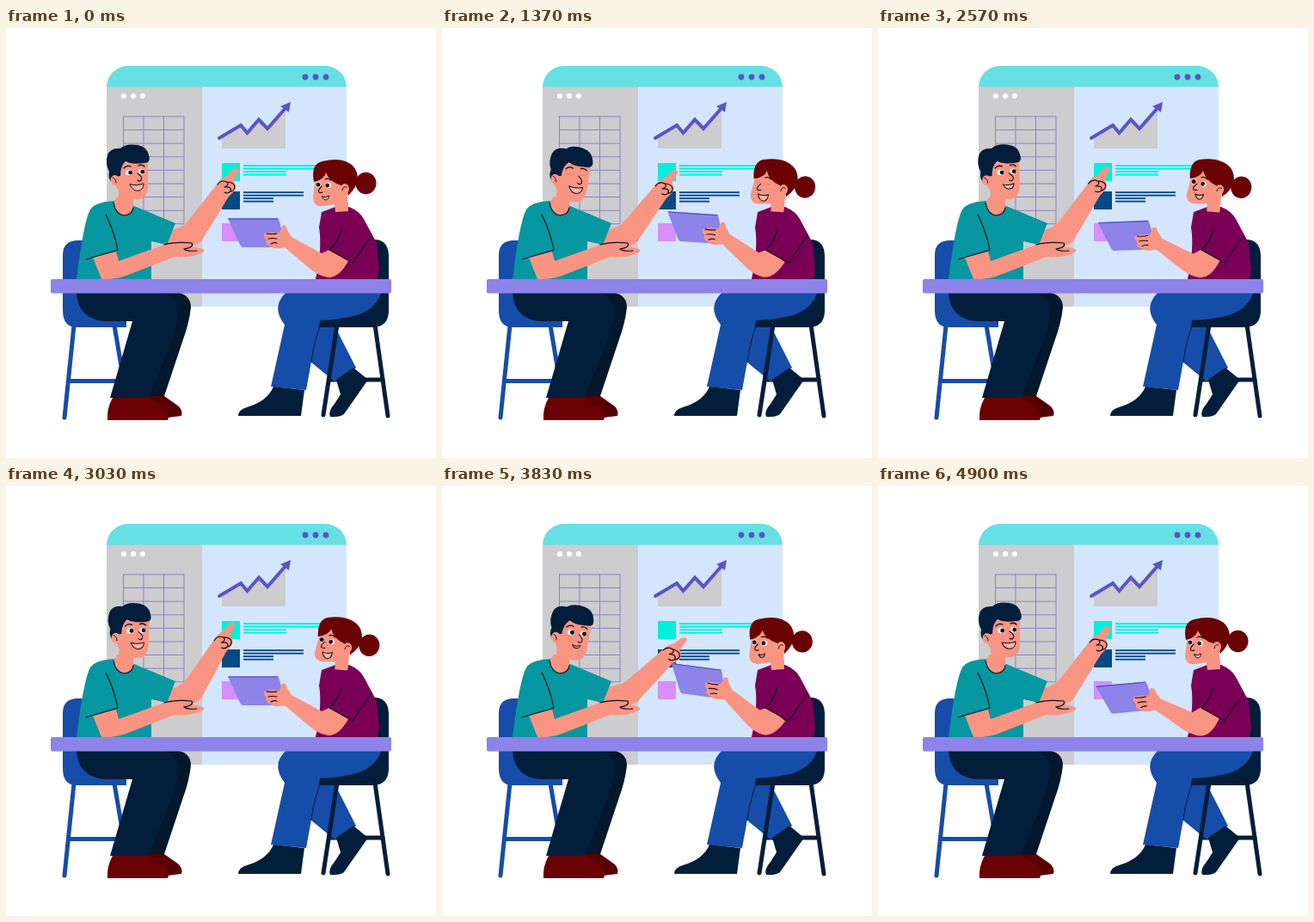
These frames come from a looping animation (500 px wide and 500 px high, 4.93 s). An HTML page with a canvas:

```html
<!DOCTYPE html>
<html lang="en">
<head>
<meta charset="utf-8">
<title>Meeting</title>
<style>
html, body { margin: 0; width: 100%; height: 100%; overflow: hidden; background: #fff; }
canvas { display: block; width: 500px; height: 500px; }
</style>
</head>
<body>
<canvas id="stage" width="500" height="500"></canvas>
<script>
const ctx = document.getElementById('stage').getContext('2d');
const LOOP = 4930;
const NAVY = '#021e3b', BLUE = '#164da9', SKIN = '#fa9482', TEAL = '#0697a0',
  PLUM = '#7a0056', RED = '#6a0205', VIOLET = '#5b54c4', LILAC = '#8d83e9', INK = '#08111c';

// Keys are [time, value] pairs, eased at both ends.
const tracks = {
  manHead: [[0, 0], [1150, 12], [2100, -4], [3000, 2], [4050, 12], [4930, 0]],
  pointing: [[0, 0], [560, -7], [1750, 5], [3000, -3.5], [3860, 11], [4930, 0]],
  womanHead: [[0, 0], [600, -5], [1400, 8], [3050, 8.5], [4000, 0], [4930, 0]],
  manMouth: [[0, 1], [570, 0.1], [1370, 1], [2070, 0.2], [3030, 0.9], [3830, 0.1], [4850, 1], [4930, 1]],
  womanMouth: [[0, 0.3], [570, 0.2], [1370, 1], [2070, 0.2], [3030, 0.9], [3830, 0.2], [4930, 0.3]]
};
const tabletKeys = [[0, 0], [1000, 8.2], [2000, -5.6], [3000, 0]];
const blinks = [570, 1365, 2085, 3500, 4340];

function at(keys, t) {
  for (let i = 1; i < keys.length; i++) {
    const [t0, a] = keys[i - 1], [t1, b] = keys[i];
    if (t <= t1) {
      const u = (t - t0) / (t1 - t0);
      return a + (b - a) * u * u * (3 - 2 * u);
    }
  }
  return keys[keys.length - 1][1];
}

function eyeOpen(t) {
  const gap = Math.min(...blinks.map(b => Math.abs(t - b)));
  return Math.max(0, Math.min(1, (gap - 10) / 110));
}

const cache = {};
const path = d => cache[d] || (cache[d] = new Path2D(d));
function fill(color, d) { ctx.fillStyle = color; ctx.fill(path(d)); }
function line(color, width, d) {
  ctx.strokeStyle = color;
  ctx.lineWidth = width;
  ctx.stroke(path(d));
}
function rect(color, x, y, w, h) { ctx.fillStyle = color; ctx.fillRect(x, y, w, h); }
function oval(color, x, y, rx, ry = rx) {
  ctx.fillStyle = color;
  ctx.beginPath();
  ctx.ellipse(x, y, rx, ry, 0, 0, Math.PI * 2);
  ctx.fill();
}
function turned(x, y, degrees, draw) {
  ctx.save();
  ctx.translate(x, y);
  ctx.rotate(degrees * Math.PI / 180);
  ctx.translate(-x, -y);
  draw();
  ctx.restore();
}

function eye(x, y, rx, look, open) {
  if (open < 0.1) {
    line('#d87a6c', 0.7, `M${x - rx} ${y}Q${x} ${y + 1.5} ${x + rx} ${y}`);
    return;
  }
  oval('#fff', x, y, rx, 3.2 * open);
  oval(INK, x + look, y, 2.4, 2.5 * open);
}

function mouth(x, y, w, open) {
  const half = w * (0.5 + 0.5 * open) / 2, deep = 4 + open * 7;
  ctx.beginPath();
  ctx.moveTo(x - half, y);
  ctx.quadraticCurveTo(x, y + 2, x + half, y - 1);
  ctx.bezierCurveTo(x + half, y + deep * 0.8, x - half * 0.4, y + deep, x - half, y);
  ctx.fillStyle = '#fcb4a8';
  ctx.fill();
  ctx.strokeStyle = INK;
  ctx.lineWidth = 1;
  ctx.stroke();
}

function textLines(color, y, long, short) {
  [long, long, short, short].forEach((w, i) => rect(color, 276, y + i * 3.5, w, 1.9));
}

function board() {
  ctx.save();
  ctx.beginPath();
  ctx.roundRect(117, 44, 279, 280, [25, 25, 0, 0]);
  ctx.clip();
  rect('#d3e6fe', 117, 44, 279, 280);
  rect('#cdccce', 117, 68, 111, 256);
  rect('#66e0e4', 117, 44, 279, 24.5);
  ctx.restore();

  for (let i = 0; i < 3; i++) {
    oval(VIOLET, 348 + i * 12, 57, 3.4);
    oval('#fff', 137 + i * 11, 79, 3.1);
  }
  for (let i = 0; i < 4; i++) rect('#827cc8', 136 + i * 23.5, 102.5, 0.9, 125);
  for (let i = 0; i < 9; i++) rect('#827cc8', 136, 102.5 + i * 15.6, 71, 0.9);

  fill('#cdccce', 'M251 140V128L273 115 281 123 294 107 304 118 325 95V140Z');
  ctx.lineJoin = 'miter';
  line(VIOLET, 4, 'M248 128L273 113 280.5 122 294 106.5 304 117 326 92');
  ctx.lineJoin = 'round';
  fill(VIOLET, 'M331 86L329 98 319 91Z');

  rect('#00f0dc', 251, 157, 21, 21);
  rect('#064a86', 251, 190, 21, 21);
  rect('#d68ffc', 251, 227, 21, 21);
  textLines('#00f0dc', 159.2, 90, 50);
  textLines('#064a86', 190.2, 70, 35);
}

function chairs() {
  fill(BLUE, 'M82 247H92V320H140V348H82Q66 348 66 328V264Q66 248 82 247Z');
  line(BLUE, 5, 'M79 346L68 453M126 346L136 405M73 410.5H127');
  fill(NAVY, 'M418 246H430Q444 247 445 264V330Q444 347 428 348H360V320H420Z');
  line(NAVY, 5, 'M376 409H438');
}

function manLegs() {
  fill('#03172d', 'M165 308H202Q215 312 215 325Q213 343 206 362L184 428 150 430Z');
  fill('#570003', 'M162 428H184L201 440Q206 446 204 451L188 453Z');
  fill(NAVY, 'M82 308H184Q200 314 201 328Q198 350 190 370L166 430H121L147 341H114Q84 338 82 308Z');
  fill(RED, 'M124 430H166L185 442Q191 449 188 456H118Q117 442 124 430Z');
}

function womanLegs() {
  fill(BLUE, 'M362 346H382L407 395 382 411 354 388Z');
  fill(NAVY, 'M404 395L421 409 393 449Q387 453 377 452Q374 446 382 437L389 426 384 409Z');
  fill(NAVY, 'M364 336H425V348H364Z');
  line(NAVY, 5, 'M429 345L444 451M385 345L369 450');
  fill(BLUE, 'M325 308H436Q431 326 408 334Q390 339 365 340L364 347 355 388 349 421 308 417 324 345Q308 325 325 308Z');
  line(NAVY, 1, 'M365 347Q358 366 355 388');
  fill(NAVY, 'M311 417L347 421 343 451H270Q270 444 280 441Q304 434 311 417Z');
}

function pointingArm() {
  fill(SKIN, 'M186 236Q204 234 211 225L245 182Q250 174 257 172L264 164Q270 161 271 165' +
    'L265 178Q270 185 264 191L259 196 227 248Q216 258 182 256Z');
  line(INK, 1.2, 'M246 182Q250 176 257 179Q260 183 254 185M254 185Q263 184 261 190Q258 193 254 191' +
    'M258 179Q266 180 266 185Q265 190 261 190');
}

function manHead(t) {
  const open = eyeOpen(t);
  fill(SKIN, 'M127 158V182L131 190V206Q138 214 147 208V199Q163 202 165 186V154Z');
  fill(NAVY, 'M123 180Q118 174 120 167Q115 158 118 148Q121 139 133 140Q139 134 153 136' +
    'Q164 138 166 148Q169 157 160 157Q147 159 139 155Q133 160 133 172L126 173Z');
  oval(SKIN, 126.5, 177, 5, 6);
  line(INK, 0.9, 'M124 174Q128 175 128 180');
  line(INK, 1.3, 'M137 163Q140 159 145 161M154 160Q158 158 161 161');
  eye(143, 168, 4, 1.6, open);
  eye(157.5, 167, 3.5, 1.2, open);
  line(INK, 1.1, 'M153 169Q160 174 157 177Q155 179 153 177');
  mouth(152, 182, 16, at(tracks.manMouth, t));
}

function man(t) {
  turned(205, 245, at(tracks.pointing, t), pointingArm);
  fill(TEAL, 'M126 201Q104 202 98 211Q90 226 82 292H169V248L187 252 197 227 149 207Z');
  fill(SKIN, 'M125 203Q127 216 137 218Q147 217 148 208V196H130Z');
  turned(136, 205, at(tracks.manHead, t), () => manHead(t));
  line(INK, 1.2, 'M125 203Q127 216 137 218Q147 217 148 209');
  fill(SKIN, 'M101 267L128 260 131 271 184 252Q194 247 208 249Q218 249 217 254' +
    'L229 257Q233 260 226 262Q213 268 196 266L142 287Q128 293 111 292Z');
  line(INK, 1.2, 'M184 252Q197 248 216 250Q219 255 207 257M207 257Q210 260 222 259');
  line(INK, 1.2, 'M116 217Q126 237 130 258L93 269');
}

function tabletArm() {
  fill(LILAC, 'M258 221.5H315Q317 222 318 225L325 255H275Q273 254 272 252Z');
  line(VIOLET, 1.3, 'M259 222H316');
  fill(SKIN, 'M300 239Q306 236 318 238L321 230Q326 228 327 235L332 243 367 262 378 257' +
    ' 398 271Q387 291 374 290Q362 288 350 277L324 255Q313 258 308 254Q300 251 303 246Q299 243 300 239Z');
  line(INK, 1.1, 'M303 239Q310 240 315 239M305 245Q310 244 315 245M308 251Q312 249 315 250');
}

function womanHead(t) {
  const open = eyeOpen(t);
  oval(RED, 418.5, 180.5, 12, 12.7);
  fill(SKIN, 'M360 172L357 198Q358 209 370 207L382 205 383 214 398 213 397 193 404 175 380 162Z');
  fill(RED, 'M358 179Q354 158 368 155Q392 149 404 161Q409 167 409 176Q408 185 398 195Q397 184 390 183' +
    'Q376 179 372 168Q370 176 358 179Z');
  oval(SKIN, 394, 187, 5, 6);
  line(INK, 0.9, 'M391 189Q392 183 396 185');
  line(INK, 1.2, 'M361 177L364 176M371 176Q375 174 378 177');
  eye(363, 182, 2.6, 0, open);
  eye(374.5, 183, 3.4, -0.8, open);
  line(INK, 1.1, 'M367 184Q362 189 364 191Q366 192 368 191');
  mouth(371.5, 196, 12, at(tracks.womanMouth, t));
}

function woman(t) {
  fill(PLUM, 'M367 214L383 208 399 208Q411 213 416 222L431 250 434 280 432 292H360Q368 255 364 232Z');
  fill(SKIN, 'M383 202H398V209Q393 215 383 212Z');
  turned(388, 209, at(tracks.womanHead, t), () => womanHead(t));
  turned(380, 280, at(tabletKeys, t % 3000), tabletArm);
  fill(PLUM, 'M404 216L416 224 426 242 403 273 376 258 389 234Z');
  line(INK, 1.2, 'M425 241L403 273 376 258Q386 249 390 234');
}

function draw(t) {
  rect('#fff', 0, 0, 500, 500);
  board();
  chairs();
  manLegs();
  womanLegs();
  man(t);
  woman(t);
  ctx.fillStyle = LILAC;
  ctx.beginPath();
  ctx.roundRect(52, 292, 396, 16.5, 2);
  ctx.fill();
}

ctx.lineCap = 'round';
ctx.lineJoin = 'round';
const start = performance.now();
function tick() {
  draw((performance.now() - start) % LOOP);
  requestAnimationFrame(tick);
}
tick();
</script>
</body>
</html>
```
